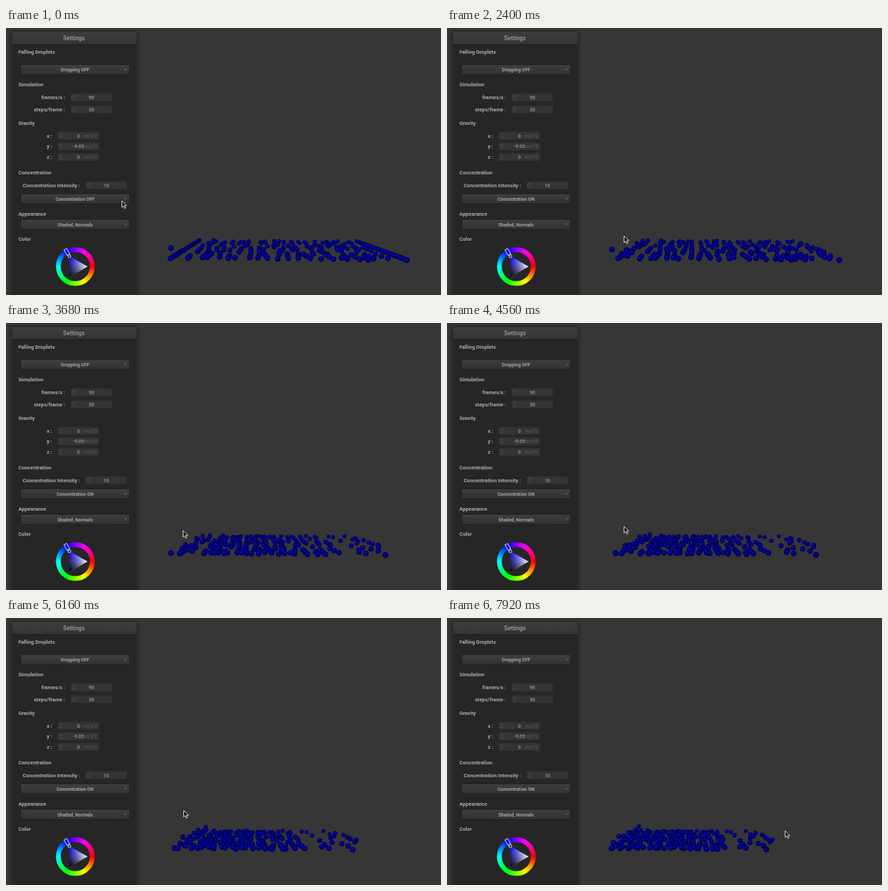
An HTML page with a canvas that plays this animation: 640 px wide and 394 px high, repeating every 8 s.

```html
<!DOCTYPE html>
<html lang="en">
<head>
<meta charset="utf-8">
<title>Settings</title>
<style>
html, body { margin: 0; width: 100%; height: 100%; overflow: hidden; background: #363636; }
svg, canvas { position: absolute; left: 0; top: 0; width: 640px; height: 394px; }
text { font: 700 7.65px Roboto, sans-serif; fill: #aaaaaa; }
.title { font-size: 8.6px; font-weight: 500; }
.btn { font-size: 6.8px; fill: #a4a4a4; }
.num { font-size: 6.9px; font-weight: 500; fill: #a0a0a0; }
.unit { font-size: 6.9px; font-weight: 400; fill: #5c5c5c; }
.item { font-size: 9.55px; fill: #acacac; }
.mid { text-anchor: middle; }
.end { text-anchor: end; }
</style>
</head>
<body>
<svg id="ui" viewBox="0 0 640 394"></svg>
<canvas id="view"></canvas>
<script>
const W = 640, H = 394, LOOP = 8000, STEP = 80;
const OPEN = 400, CLOSE = 1360;
const $ = id => document.getElementById(id);

// ---- settings panel
const text = (x, y, s, cls = '', id = '') => `<text x="${x}" y="${y}" class="${cls}" id="${id}">${s}</text>`;
const box = (x, y, w, h, fill, extra = '') =>
  `<rect x="${x}" y="${y}" width="${w}" height="${h}" rx="1.5" fill="${fill}" ${extra}/>`;
const edge = 'stroke="#1b1b1b" stroke-width=".8"';

const button = (y, label, id = '') =>
  box(21.5, y, 160.5, 14.6, 'url(#face)', `${edge} id="${id}Face"`) +
  `<path d="M22.5 ${y + 1}H181" stroke="#484848" stroke-width=".6"/>` +
  text(101.6, y + 10.1, label, 'btn mid', id) +
  `<path d="M175 ${y + 5.3}l1.5 1.6l-1.5 1.6" fill="none" stroke="#909090" stroke-width=".9"/>`;

const field = (x, y, label, value, unit = '') =>
  text(x - 8, y + 8.4, label + ' :', 'end') +
  box(x, y, 61, 11.5, '#343434', 'stroke="#2b2b2b" stroke-width=".6"') +
  `<path d="M${x + 2.5} ${y + 4.7}l2-2l2 2M${x + 2.5} ${y + 7}l2 2l2-2" fill="none" stroke="#606060" stroke-width=".8"/>` +
  text(x + 30.7, y + 8.4, value, 'num mid') +
  (unit && text(x + 39, y + 8.4, unit, 'unit'));

const fade = (id, a, b) => `<linearGradient id="${id}" x2="0" y2="1">
  <stop stop-color="${a}"/><stop offset="1" stop-color="${b}"/></linearGradient>`;

$('ui').innerHTML = `<defs>${fade('face', '#3e3e3e', '#313131')}${fade('bar', '#3e3e3e', '#333333')}
  <filter id="soft" x="-20%" y="-20%" width="140%" height="140%"><feGaussianBlur stdDeviation="2.5"/></filter></defs>` +
  box(8, 6, 185, 400, '#1c1c1c', 'filter="url(#soft)"') +
  box(9, 6, 183, 400, '#262626') +
  box(9, 6, 183, 18.5, 'url(#bar)') +
  '<path d="M9 24.7H192" stroke="#191919" stroke-width=".8"/>' +
  text(100, 18.3, 'Settings', 'title mid', 'title') +
  [['Falling Droplets', 38], ['Simulation', 86], ['Gravity', 143], ['Concentration', 216],
   ['Appearance', 276.5], ['Color', 314.3]].map(([s, y]) => text(18.2, y, s)).join('') +
  button(54.3, 'Dropping OFF') +
  field(95, 96.6, 'frames/s', 90) + field(95, 114.3, 'steps/frame', 30) +
  field(76, 153.2, 'x', 0, 'm/s^2') + field(76, 168.8, 'y', '-9.05', 'm/s^2') + field(76, 184.6, 'z', 0, 'm/s^2') +
  field(117, 226.2, 'Concentration Intensity', 10) +
  button(245, '', 'mode') + button(282.7, 'Shaded, Normals') +
  '<g id="popup">' +
  box(199, 232, 111, 58, '#232323', 'filter="url(#soft)"') +
  '<path d="M201 245l-7 7l7 7z" fill="#2a2a2a"/>' +
  box(200, 233, 109, 56, '#2a2a2a') +
  box(207, 240, 94, 18.2, '#222222', edge) + box(207, 262.3, 94, 18.2, '#333333', edge) +
  text(253.8, 252.8, 'Concentration OFF', 'item mid') + text(254, 275.2, 'Concentration ON', 'item mid') + '</g>';

// ---- helpers
let seed = 11;
const rnd = () => (seed = seed * 16807 % 2147483647) / 2147483647;
const mix = (a, b, k) => a + (b - a) * k;

// piecewise linear track: keys are [position, value]
function track(keys, p) {
  let i = 1;
  while (i < keys.length - 1 && keys[i][0] < p) i++;
  const [a, x] = keys[i - 1], [b, y] = keys[i];
  return mix(x, y, Math.min(1, Math.max(0, (p - a) / (b - a))));
}

// ---- droplets: rank q from left to right, depth v from front to back
const drops = [];
const addDrop = (q, v, more) => drops.push({ q, v, phase: 0, speed: 0, hop: 0, loose: 0, ...more });

// the inner ones cling together in short strings that sway as one
for (let i = 0; i < 21; i++) {
  let v = rnd() * .06;
  while (v < 1) {
    const q = .14 + .72 * (i + .5 + (rnd() - .5) * .8) / 21, slant = (rnd() - .5) * .014;
    const sway = { phase: rnd() * 6.28, speed: 1 + rnd() };
    for (let n = 1 + Math.floor(rnd() * 3), k = 0; k < n && v < 1; k++, v += .085)
      addDrop(q + slant * k, v, sway);
    v += .07 + rnd() * .1;
  }
}
// rows along both side walls
for (let k = 0; k < 22; k++) {
  addDrop(.099 * rnd(), k / 21, { hop: k % 3 == 1 ? 5 + 8 * rnd() : 0 });
  addDrop(.901 + .099 * rnd(), k / 21);
}
addDrop(0, .01, { loose: 15 });

// spread of the droplets over the floor's width, by rank, at a few times
const ranks = [0, .1, .3, .5, .7, .9, 1];
const spreads = [
  [1500, [0, 0, .25, .5, .75, 1, 1]],
  [2400, [0, .07, .27, .49, .72, .92, 1]],
  [3680, [0, .1, .23, .37, .53, .8, 1]],
  [5440, [.03, .07, .18, .31, .45, .67, .95]],
  [6800, [0, .05, .17, .29, .41, .59, .84]],
  [7920, [0, 0, .12, .24, .37, .53, .76]]
];
const lift = [[3680, 0], [5440, .8], [6800, 1], [7920, 1]];
const looseLift = [[1700, 1], [2400, .85], [3680, 0]];

const pointerX = [[400, 170], [960, 236], [1360, 236], [1840, 250], [2240, 260], [5280, 260], [6160, 261], [6800, 263], [7120, 263], [7920, 497]];
const pointerY = [[400, 255], [960, 268], [1360, 268], [1840, 291], [2240, 307], [3560, 307], [4400, 301], [5280, 296], [5440, 293], [6160, 284], [6800, 270], [7120, 270], [7920, 314]];

// ---- canvas
const view = $('view'), ctx = view.getContext('2d'), dpr = window.devicePixelRatio || 1;
view.width = W * dpr;
view.height = H * dpr;
const place = (x, y, s = 1) => ctx.setTransform(dpr * s, 0, 0, dpr * s, dpr * x, dpr * y);

const ball = ctx.createRadialGradient(-.25, -.35, 0, 0, 0, 1);
ball.addColorStop(0, '#1010b0');
ball.addColorStop(.45, '#000094');
ball.addColorStop(.8, '#000066');
ball.addColorStop(1, '#00003c');

const hues = ctx.createConicGradient(0, 0, 0);
for (let k = 0; k <= 6; k++) hues.addColorStop(k / 6, `hsl(${k * 60} 100% 50%)`);

function drawWheel() {
  place(102, 352);
  ctx.lineWidth = 7;
  ctx.strokeStyle = hues;
  ctx.beginPath();
  ctx.arc(0, 0, 25, 0, 7);
  ctx.stroke();

  ctx.rotate(Math.PI * 4 / 3);
  const r = 18, ax = -r / 2, ay = r * .866;
  ctx.beginPath();
  ctx.moveTo(r, 0);
  ctx.lineTo(ax, ay);
  ctx.lineTo(ax, -ay);
  ctx.closePath();
  const tint = ctx.createLinearGradient(r, 0, ax, ay);
  tint.addColorStop(0, '#00f');
  tint.addColorStop(1, '#fff');
  const dark = ctx.createLinearGradient(r / 4, ay / 2, ax, -ay);
  dark.addColorStop(0, '#0000');
  dark.addColorStop(1, '#000');
  for (const paint of [tint, dark]) {
    ctx.fillStyle = paint;
    ctx.fill();
  }
  ctx.strokeStyle = '#dcdcdc';
  ctx.lineWidth = 1;
  ctx.strokeRect(20.5, -2.2, 9, 4.4);
  ctx.beginPath();
  ctx.arc(17.5, 0, 2, 0, 7);
  ctx.stroke();
}

function drawDrops(t) {
  const spread = ranks.map((q, i) => [q, track(spreads.map(([at, us]) => [at, us[i]]), t)]);
  const up = track(lift, t), loose = track(looseLift, t);
  const balls = drops.map(d => {
    const angle = d.phase + t / 1000 * d.speed, sway = d.speed && .006;
    const u = track(spread, d.q) + sway * Math.sin(angle);
    const v = Math.min(1, Math.max(0, d.v + 3 * sway * Math.cos(angle)));
    const s = 1 / (1 + .506 * v);
    return {
      x: 370 + s * (46 + (u - .5) * 348),
      y: 259.7 + s * (80.3 + 2.5 * u - d.hop * up - d.loose * loose),
      s
    };
  }).sort((a, b) => a.s - b.s);
  ctx.fillStyle = ball;
  for (const { x, y, s } of balls) {
    place(x, y, 4.3 * s);
    ctx.beginPath();
    ctx.arc(0, 0, 1, 0, 7);
    ctx.fill();
  }
}

const arrow = new Path2D('M0 0V9.6L2.2 7.6L3.8 11.3L5.5 10.6L3.9 7H7Z');
function drawPointer(t) {
  place(track(pointerX, t) + .5, track(pointerY, t));
  ctx.fillStyle = '#0a0a0a';
  ctx.strokeStyle = '#e0e0e0';
  ctx.lineWidth = 1;
  ctx.fill(arrow);
  ctx.stroke(arrow);
}

function draw(now) {
  const t = Math.floor(now % LOOP / STEP) * STEP;
  const open = t >= OPEN && t < CLOSE;
  $('popup').style.display = open ? '' : 'none';
  $('title').style.fill = open ? '#d4d4d4' : '#a0a0a0';
  $('modeFace').style.fill = open ? '#202020' : '';
  $('mode').textContent = 'Concentration ' + (t < CLOSE ? 'OFF' : 'ON');

  place(0, 0);
  ctx.clearRect(0, 0, W, H);
  drawWheel();
  drawDrops(t);
  drawPointer(t);
}

const start = performance.now();
function tick() {
  draw(performance.now() - start);
  requestAnimationFrame(tick);
}
tick();
</script>
</body>
</html>
```
